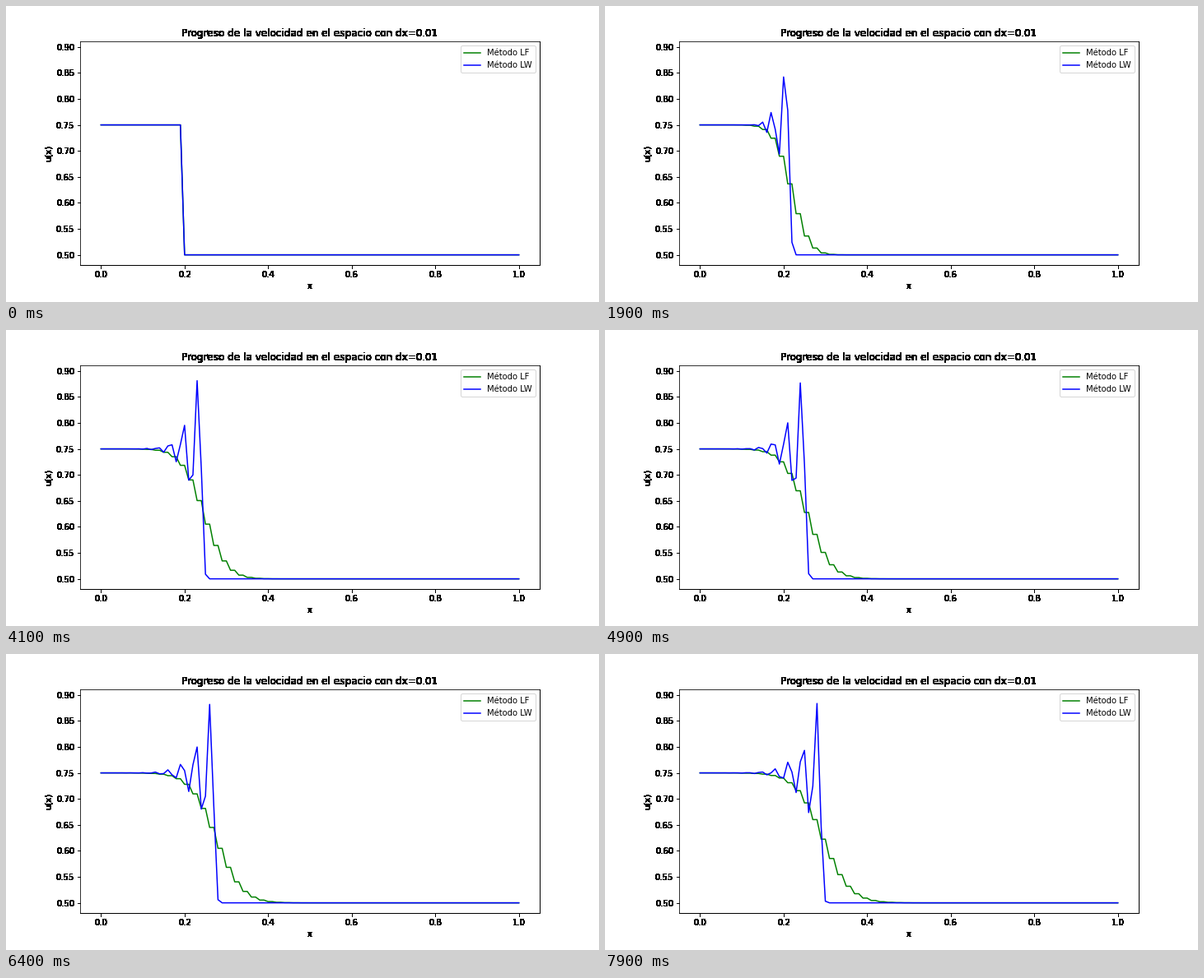
Recreate the animation shown at these times as a matplotlib script. Size 720 by 360 pixels, loop 8 s.

```python
import numpy as np
import matplotlib.pyplot as plt
from matplotlib.animation import FuncAnimation

FRAMES, INTERVAL = 80, 100
N, RATIO = 101, 0.5  # grid points, dt/dx


def flux(u):
    return u * (u - 1)


def lax_friedrichs(u):
    f, new = flux(u), u.copy()
    new[1:-1] = (u[2:] + u[:-2]) / 2 - RATIO / 2 * (f[2:] - f[:-2])
    return new


def lax_wendroff(u):
    """Two-step (Richtmyer) form."""
    half = (u[1:] + u[:-1]) / 2 - RATIO / 2 * np.diff(flux(u))
    new = u.copy()
    new[1:-1] -= RATIO * np.diff(flux(half))
    return new


def solve(step):
    states = [np.where(np.arange(N) < 20, 0.75, 0.5)]
    while len(states) < FRAMES:
        states.append(step(states[-1]))
    return np.array(states)


def solid(img, dpi):
    """Turn every touched pixel fully black, for hard-edged text."""
    img[..., :3] = 0
    img[..., 3] = img[..., 3] > 0
    return img, 0, 0


x = np.linspace(0, 1, N)
lf, lw = solve(lax_friedrichs), solve(lax_wendroff)

fig, ax = plt.subplots(figsize=(10, 5), dpi=72, facecolor="white")
fig.subplots_adjust(left=0.125, right=0.9, bottom=0.125, top=0.88)
line_lf, = ax.plot(x, lf[0], color="green", lw=1.5, label="Método LF")
line_lw, = ax.plot(x, lw[0], color="blue", lw=1.5, label="Método LW")

low, high = 0.5, lw.max()
pad = 0.05 * (high - low)
ax.set_xlim(-0.05, 1.05)
ax.set_ylim(low - pad, high + pad)
ax.set_title("Progreso de la velocidad en el espacio con dx=0.01")
ax.set_xlabel("x")
ax.set_ylabel("u(x)")
ax.legend(loc="upper right")

for part in (ax.title, ax.xaxis, ax.yaxis, ax.spines["right"], ax.spines["bottom"]):
    part.set_agg_filter(solid)


def update(i):
    line_lf.set_ydata(lf[i])
    line_lw.set_ydata(lw[i])
    return line_lf, line_lw


anim = FuncAnimation(fig, update, frames=FRAMES, interval=INTERVAL, repeat=True)
plt.show()
```
